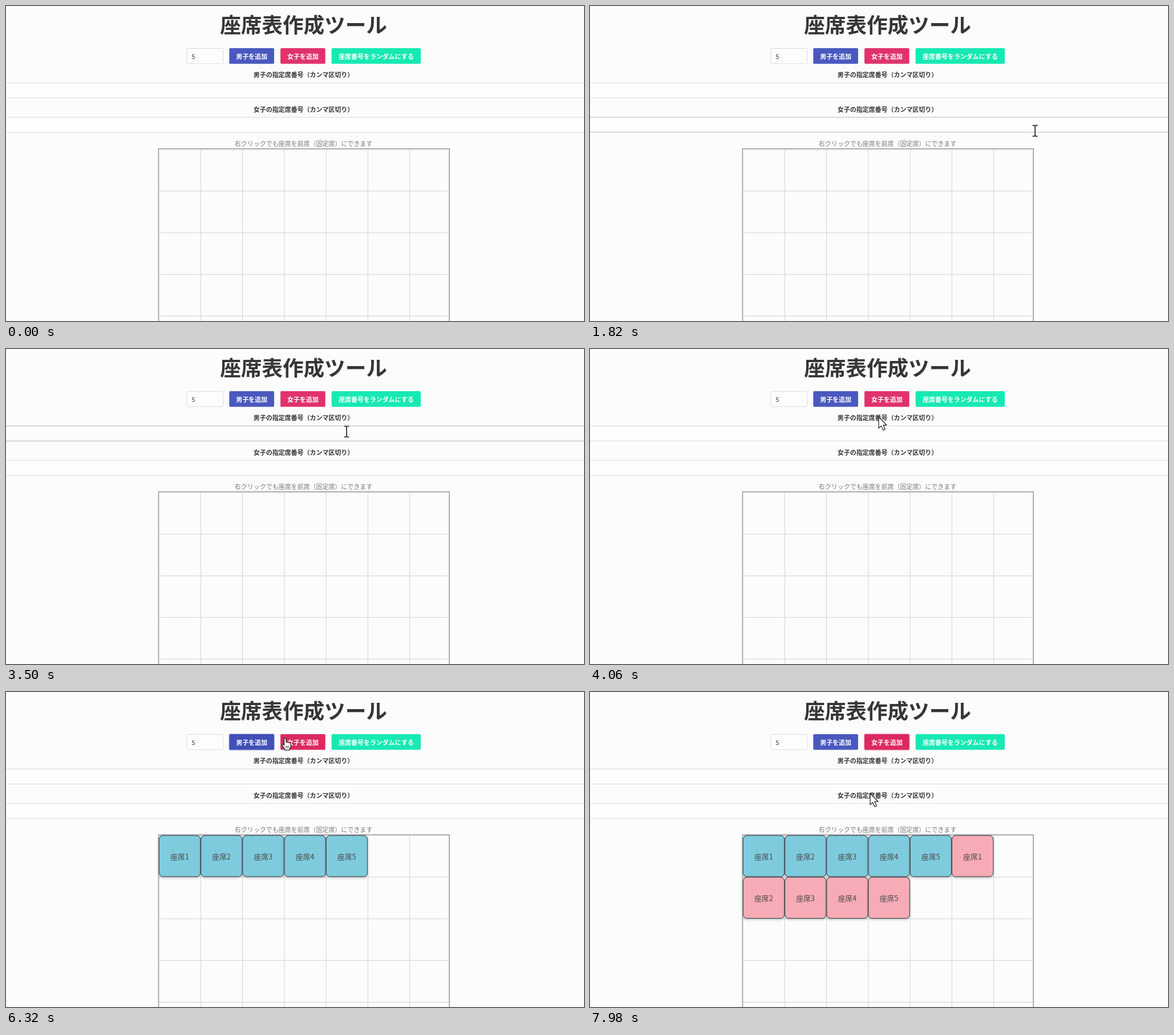
These frames come from a looping animation (1013 px wide and 553 px high, 8 s). An HTML page:

```html
<!DOCTYPE html>
<html lang="ja">
<head>
<meta charset="utf-8">
<title>座席表作成ツール</title>
<style>
html, body { margin: 0; width: 100%; height: 100%; overflow: hidden; background: #fcfcfc; }
svg { display: block; width: 1013px; height: 553px; }
text { font-family: "Noto Sans CJK JP", "Noto Sans CJK", "Noto Sans", sans-serif; text-anchor: middle; }
</style>
</head>
<body>
<svg id="stage" viewBox="0 0 1013 553" lang="ja"></svg>
<script>
const stage = document.getElementById('stage');
const LOOP = 8000;
const UNIT = 0.915;
const CENTER = 521.5;
const CELL = 73.2;
const SEATS_PER_ROW = 6;
const GRID = { x: 268, y: 251.5 };
const BOYS_ADDED = 5900, GIRLS_ADDED = 6900;

function add(tag, attrs, parent = stage, content) {
  const node = document.createElementNS('http://www.w3.org/2000/svg', tag);
  set(node, attrs);
  if (content) node.textContent = content;
  return parent.appendChild(node);
}
function set(node, attrs) {
  for (const key in attrs) node.setAttribute(key, attrs[key]);
}
// Places a line of text by its visual middle.
function label(content, x, y, size, fill, weight = 400, parent = stage) {
  const px = size * UNIT;
  return add('text', { x, y: y + px * 0.38, 'font-size': px, 'font-weight': weight, fill }, parent, content);
}
function show(node, visible) {
  node.setAttribute('visibility', visible ? 'visible' : 'hidden');
}

function makeButton(x, width, content, color, hoverColor) {
  const box = { x, y: 74, width, height: 27.4, rx: 2 };
  const ring = add('rect', { ...box, fill: 'none', stroke: color, 'stroke-opacity': 0.25, 'stroke-width': 3 });
  const face = add('rect', { ...box, fill: color });
  label(content, x + width / 2, 88.4, 12, '#fff', 700);
  return { x, width, ring, face, color, hoverColor };
}
function makeField(title, y) {
  label(title, CENTER, y - 13.7, 12, '#363636', 700);
  const box = add('rect', { x: -10, y, width: 1033, height: 26.5, fill: '#fdfdfd', 'stroke-width': 1 });
  return { y, box };
}
function makeSeats(first, fill) {
  const group = add('g', {});
  for (let i = 0; i < 5; i++) {
    const x = GRID.x + (first + i) % SEATS_PER_ROW * CELL;
    const y = GRID.y + Math.floor((first + i) / SEATS_PER_ROW) * CELL;
    add('rect', {
      x: x + 0.4, y: y + 0.4, width: CELL - 0.9, height: CELL - 0.9, rx: 7,
      fill, stroke: '#4c5558', 'stroke-width': 1.2, filter: 'url(#shadow)'
    }, group);
    label('座席' + (i + 1), x + CELL / 2 - 0.2, y + 37.4, 14, '#4a4a4a', 400, group);
  }
  return group;
}

const shadow = add('filter', { id: 'shadow', x: '-20%', y: '-20%', width: '140%', height: '150%' }, add('defs', {}));
add('feDropShadow', { dx: 0, dy: 2, stdDeviation: 2.2, 'flood-color': '#000', 'flood-opacity': 0.2 }, shadow);

add('rect', { width: 1013, height: 553, fill: '#fcfcfc' });
label('座席表作成ツール', CENTER, 33, 40, '#363636', 700);

add('rect', { x: 316.9, y: 74.4, width: 63.6, height: 26.8, rx: 2, fill: '#fdfdfd', stroke: '#dbdbd8', 'stroke-width': 1 });
label('5', 328.2, 88.4, 12, '#363636');
const buttons = [
  makeButton(391.3, 78.6, '男子を追加', '#4a59bf', '#4050b5'),
  makeButton(481, 78.6, '女子を追加', '#e0336b', '#dc2960'),
  makeButton(570.6, 156.3, '座席番号をランダムにする', '#17e9b3', '#12dca8')
];
const fields = [
  makeField('男子の指定席番号（カンマ区切り）', 135),
  makeField('女子の指定席番号（カンマ区切り）', 195.3)
];
label('右クリックでも座席を前席（固定席）にできます', CENTER, 242.1, 12, '#7a7a7a');

for (let i = 1; i < 7; i++) {
  const x = GRID.x + i * CELL + 0.2;
  add('path', { d: `M${x} 251V553`, stroke: '#d1d0e1', 'stroke-width': 1 });
}
for (let i = 1; i < 5; i++) {
  const y = GRID.y + i * CELL + 0.2;
  add('path', { d: `M268 ${y}H777`, stroke: '#d1d0dc', 'stroke-width': 1 });
}
add('path', { d: 'M267.4 560V250.8H777V560', fill: 'none', stroke: '#a9a9ab', 'stroke-width': 1.9 });

const boys = makeSeats(0, '#7fcbde');
const girls = makeSeats(5, '#f7abb6');

const outline = { fill: '#fff', stroke: '#222', 'stroke-width': 1.2, 'stroke-linejoin': 'round' };
const cursors = { arrow: add('g', {}), beam: add('g', {}), hand: add('g', {}) };
add('path', { ...outline, d: 'M.5 .5V20.5L5 16.3L8.3 24L11.8 22.4L8.5 14.9H14.4Z' }, cursors.arrow);
const beamPath = 'M-4.5 -9.5H-1.5L0 -8.4L1.5 -9.5H4.5M0 -8.4V8.4M-4.5 9.5H-1.5L0 8.4L1.5 9.5H4.5';
add('path', { d: beamPath, fill: 'none', stroke: '#fff', 'stroke-width': 3 }, cursors.beam);
add('path', { d: beamPath, fill: 'none', stroke: '#222', 'stroke-width': 1.7 }, cursors.beam);
add('path', {
  ...outline,
  d: 'M-2 1.3Q-2 -.3 -.3 -.3Q1.4 -.3 1.4 1.3V6.5Q3.2 5.5 4.5 7Q6.2 6.2 7.3 7.8Q9.6 7.4 9.6 9.8V14.5L7.8 17.5V20.3H-1.2V18.4L-5.6 11.9Q-6.2 9.6 -4 10L-2 12Z'
}, cursors.hand);
add('path', { d: 'M1.2 13V17M3.4 13V17M5.6 13V17', stroke: '#222', 'stroke-width': 0.9 }, cursors.hand);

// Time, x, y
const path = [
  [1260, 1003, 305], [1500, 925, 264], [1780, 795, 221], [1980, 722, 212],
  [2300, 652, 212], [2640, 632, 212], [2820, 624, 207], [2980, 616, 196],
  [3240, 604, 162], [3500, 597, 145], [3660, 567, 142], [3860, 538, 134],
  [4200, 483, 108], [4500, 459, 93], [4760, 447, 90], [5960, 447, 90],
  [6320, 489.5, 81.5], [6420, 489.5, 81.5], [6640, 500, 87], [7500, 500, 87],
  [7720, 495, 130], [7980, 490.5, 177.5], [8000, 490.5, 177.5]
];
function positionAt(time) {
  let i = 0;
  while (i < path.length - 2 && path[i + 1][0] <= time) i++;
  const [t0, x0, y0] = path[i], [t1, x1, y1] = path[i + 1];
  const k = (time - t0) / (t1 - t0);
  return { x: x0 + (x1 - x0) * k, y: y0 + (y1 - y0) * k };
}

function draw(time) {
  const visible = time >= path[0][0];
  const { x, y } = positionAt(Math.max(time, path[0][0]));
  const focused = time >= GIRLS_ADDED ? 1 : time >= BOYS_ADDED ? 0 : -1;
  let kind = 'arrow';

  buttons.forEach((button, i) => {
    const over = visible && x >= button.x && x <= button.x + button.width && y >= 74 && y <= 101.4;
    if (over) kind = 'hand';
    set(button.face, { fill: over || i === focused ? button.hoverColor : button.color });
    show(button.ring, i === focused);
  });
  for (const field of fields) {
    const over = visible && y >= field.y && y <= field.y + 26.5;
    if (over) kind = 'beam';
    set(field.box, { stroke: over ? '#b7b7b7' : '#dadad6' });
  }
  show(boys, time >= BOYS_ADDED);
  show(girls, time >= GIRLS_ADDED);
  for (const name in cursors) show(cursors[name], visible && name === kind);
  set(cursors[kind], { transform: `translate(${x} ${y})` });
}

const start = performance.now();
function tick() {
  draw((performance.now() - start) % LOOP);
  requestAnimationFrame(tick);
}
tick();
</script>
</body>
</html>
```
